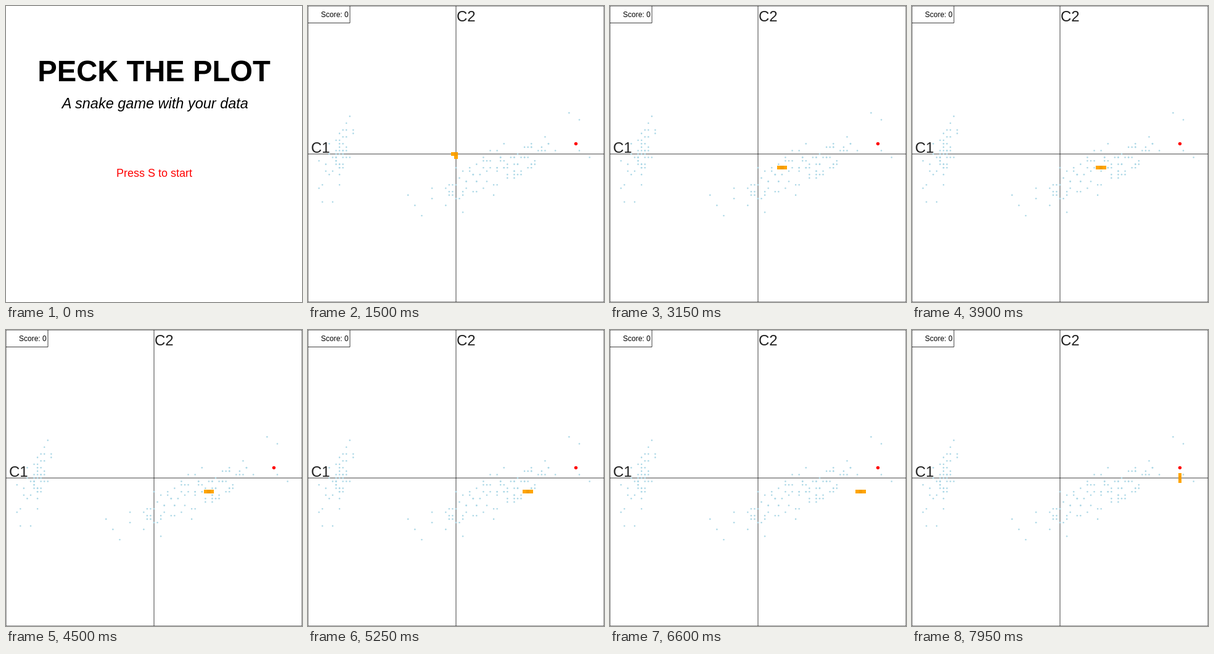
These frames come from a looping animation (480 px wide and 480 px high, 8 s). An HTML page:

```html
<!DOCTYPE html>
<html lang="en">
<head>
<meta charset="utf-8">
<title>Snake on a scatter plot</title>
<style>
  html, body { margin: 0; width: 100%; height: 100%; overflow: hidden; background: #fff; }
  svg { display: block; width: 100vw; height: 100vh; font-family: "Liberation Sans", Arial, sans-serif; }
  .mid { text-anchor: middle; }
  .line { fill: none; stroke: #000; stroke-width: 0.75; }
  .label { font-size: 24px; fill: #222; }
  #dots { fill: #add8e6; }
  #snake { fill: #ffa500; shape-rendering: crispEdges; }
  #snake :nth-child(2) { fill: #f49c00; }
</style>
</head>
<body>
<svg viewBox="0 0 480 480">
  <g id="intro" class="mid">
    <text x="240" y="122" font-size="47.2" font-weight="bold">PECK THE PLOT</text>
    <text x="241.8" y="166" font-size="23.5" font-style="italic">A snake game with your data</text>
    <text x="240.5" y="277" font-size="18" fill="#f00">Press S to start</text>
  </g>
  <g id="game" visibility="hidden">
    <path class="line" d="M0 0H480V480H0ZM240 0V480M0 240H480"/>
    <path class="line" d="M0 27.5H68V0"/>
    <text x="21" y="18" font-size="12">Score: 0</text>
    <text class="label" x="241" y="25">C2</text>
    <text class="label" x="5" y="237.5">C1</text>
    <g id="dots"></g>
    <circle id="food" r="2.7" fill="#f00"/>
    <g id="snake"><rect/><rect/><rect/></g>
  </g>
</svg>
<script>
const LOOP = 8000, START = 1500, TICK = 150;
const CELL = 480 / 1.08 / 80;   // 80 cells plus a 4% margin on each side

const $ = id => document.getElementById(id);
const px = i => 240 + i * CELL;
const py = j => 240 - j * CELL;
const set = (el, attrs) => {
  for (const key in attrs) el.setAttribute(key, attrs[key]);
};

let seed = 7;
function random() {
  seed = (seed * 16807) % 2147483647;
  return seed / 2147483647;
}

// Bell-shaped value between -1 and 1
const bell = () => (random() + random() + random()) / 1.5 - 1;

function addDot(i, j) {
  const dot = document.createElementNS("http://www.w3.org/2000/svg", "circle");
  set(dot, { cx: px(i), cy: py(j), r: 1.3 });
  $("dots").append(dot);
}

// Cloud of grid points scattered around a sloping line
function addCloud(count, { x, y, slope, w, h }) {
  for (let k = 0; k < count; k++) {
    const dx = w * bell();
    addDot(Math.round(x + dx), Math.round(y + slope * dx + h * bell()));
  }
}

addCloud(48, { x: -34.4, y: -1, slope: 0.9, w: 5.5, h: 10 });
addCloud(96, { x: 12, y: -4.5, slope: 0.33, w: 25, h: 9 });
const outliers = [
  [-40, -10], [-40, -2], [-36, -14], [-31, 11], [-14, -12], [-12, -15],
  [-10, -18], [2, -17], [33, 12], [36, 10], [36, 1], [39, -1]
];
outliers.forEach(([i, j]) => addDot(i, j));
set($("food"), { cx: px(35), cy: py(3) });

// Cell entered at step n: right, down, right, then up to the food
function cellAt(n) {
  return n <= 3
    ? [Math.min(n + 1, 0), Math.min(-1 - n, 0)]
    : [Math.min(n - 3, 35), Math.max(n - 42, -4)];
}

const parts = [...$("snake").children];

function drawSnake(n) {
  parts.forEach((part, k) => {
    const [i, j] = cellAt(n - k);
    const x = Math.round(px(i - 0.5)), y = Math.round(py(j + 0.5));
    set(part, {
      x, y,
      width: Math.round(px(i + 0.5)) - x,
      height: Math.round(py(j - 0.5)) - y
    });
  });
}

function draw() {
  const t = performance.now() % LOOP;
  const playing = t >= START;
  set($("intro"), { visibility: playing ? "hidden" : "visible" });
  set($("game"), { visibility: playing ? "visible" : "hidden" });
  if (playing) drawSnake(Math.floor((t - START) / TICK));
  requestAnimationFrame(draw);
}
draw();
</script>
</body>
</html>
```
